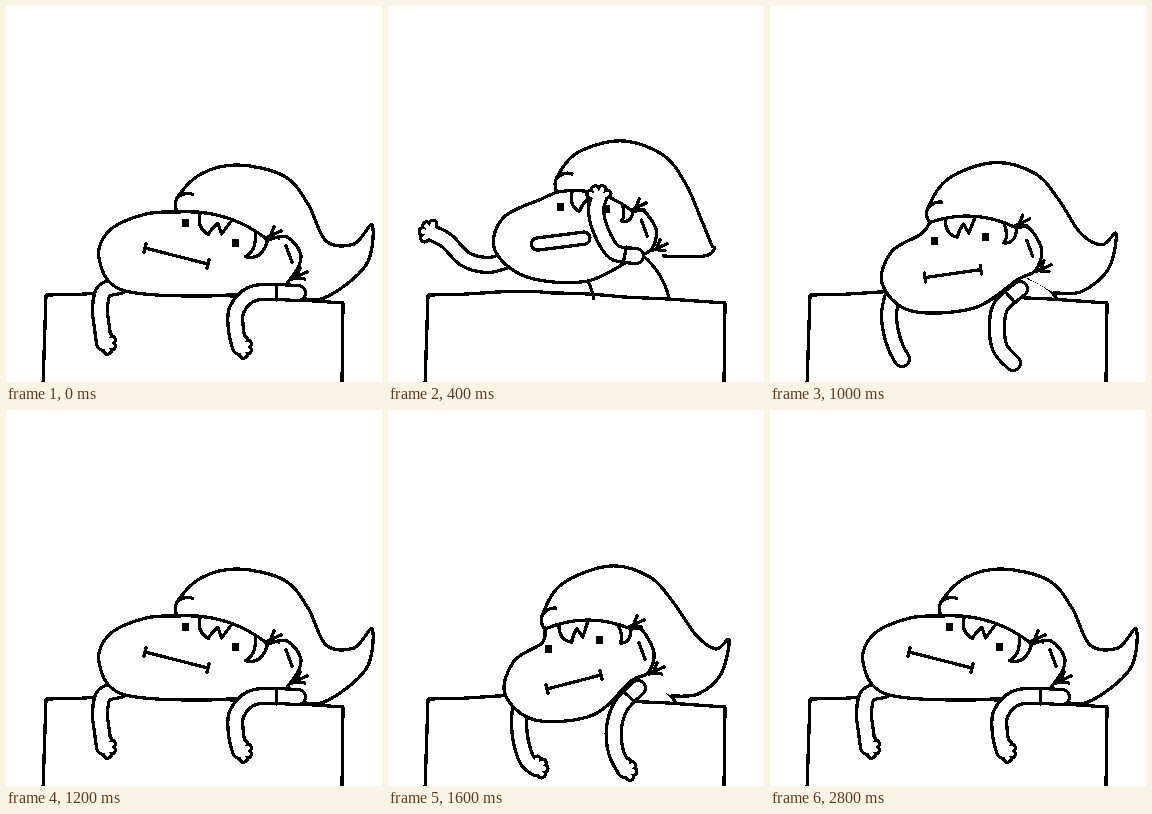
These frames come from a looping animation (376 px wide and 376 px high, 3.3 s). An HTML page:

```html
<!DOCTYPE html>
<html lang="en">
<head>
<meta charset="utf-8">
<title>Restless doodle</title>
<style>
  html, body { margin: 0; width: 100%; height: 100%; overflow: hidden; background: #fff; }
  svg { display: block; width: 100vw; height: 100vh; }
  path { stroke-linecap: round; stroke-linejoin: round; shape-rendering: crispEdges; }
</style>
</head>
<body>
<svg id="stage" viewBox="0 0 376 376"></svg>
<script>
const LOOP = 3300, PEN = 3.3;

// Key points of the three main poses; everything else is derived from them.
const lying = {
  brim: [172,206, 262,234], parting: 0.23, lock: 28,
  hat: [171,207, 171,192, 195,168, 232,159, 278,170, 302,198, 320,235, 348,238, 366,219, 360,259, 318,292, 285,290],
  head: [140,208, 104,224, 93,252, 116,284, 200,290, 268,283, 285,272, 295,250, 281,231],
  eyes: [179,217, 229,237],
  mouth: [139,242, 202,258], gape: 0,
  body: [200,282, 200,288, 262,280, 280,288],
  left: [114,280, 98,285, 94,303, 96,322, 98,337],
  right: [292,287, 249,287, 231,303, 230,324, 234,341],
  aim: [0, 0], reach: 8
};
const shouting = {
  brim: [183,146, 248,190], parting: 0.22, lock: 12,
  hat: [183,146, 186,131, 207,114, 246,109, 290,126, 313,160, 320,200, 318,238, 309,258, 301,232, 287,210, 264,206],
  head: [155,143, 103,163, 94,194, 128,223, 190,239, 247,230, 267,220, 271,201, 258,187],
  eyes: [186,154, 226,171],
  mouth: [138,188, 175,192], gape: 27,
  body: [188,239, 213,289, 254,227, 273,292],
  left: [100,199, 84,187, 70,165, 66,145, 68,128],
  right: [268,233, 238,230, 224,202, 230,168, 248,138],
  aim: [-1.6, -0.8], reach: 10
};
const bored = {
  brim: [157,219, 243,219], parting: 0.16, lock: 18,
  hat: [157,220, 154,206, 174,174, 222,156, 262,167, 285,192, 308,225, 328,239, 341,230, 333,264, 310,284, 284,286],
  head: [154,233, 126,251, 117,284, 147,310, 205,305, 243,271, 260,263, 266,243, 254,220],
  eyes: [160,239, 211,230],
  mouth: [159,279, 213,265], gape: 0,
  body: [200,290, 200,296, 258,270, 288,293],
  left: [132,298, 131,314, 133,332, 139,350, 148,358],
  right: [250,278, 233,296, 226,318, 228,342, 237,360],
  aim: [-0.3, -0.2], reach: 8
};

function mix(a, b, k) {
  if (typeof a === 'number') return a + (b - a) * k;
  if (Array.isArray(a)) return a.map((v, i) => mix(v, b[i], k));
  return Object.fromEntries(Object.keys(a).map(n => [n, mix(a[n], b[n], k)]));
}

// Arms flung sideways, for the jump up and the drop back down.
const fling = (pose, dx, dy) => Object.assign(pose, {
  left: [100,230, 82,234, 60,228, 42,210, 27,202].map((v, i) => v + (i % 2 ? dy : dx)),
  right: [248,250, 226,246, 213,225, 208,205, 211,192],
  aim: [-2.6, -1.6]
});
const rising = fling(mix(lying, shouting, 0.5), 0, 0);
const falling = fling(mix(shouting, bored, 0.55), 17, 25);
const slumping = mix(bored, lying, 0.6);
const turning = Object.assign(mix(bored, lying, 0.2), {
  left: [122,292, 119,308, 121,326, 126,342, 132,353],
  right: [250,283, 231,300, 227,320, 230,342, 243,357],
  reach: 0
});

const steps = [
  [0, lying], [100, rising], [200, shouting], [400, falling], [500, bored],
  [1000, turning], [1100, slumping], [1200, lying],
  [1400, slumping], [1500, turning], [1600, bored],
  [2600, turning], [2700, slumping], [2800, lying]
];

const points = flat => flat.flatMap((v, i) => i % 2 ? [] : [[v, flat[i + 1]]]);

function spline(flat) {
  const p = points(flat);
  return 'M' + p[0] + p.slice(1).map((c, i) => {
    const b = p[i], a = p[i - 1] || b, e = p[i + 2] || c;
    const c1 = b.map((v, j) => v + (c[j] - a[j]) / 6);
    const c2 = c.map((v, j) => v - (e[j] - b[j]) / 6);
    return `C${c1} ${c2} ${c}`;
  }).join('');
}

const path = (d, color, width, fill = 'none') =>
  `<path d="${d}" stroke="${color}" stroke-width="${Math.max(0, width)}" fill="${fill}"/>`;
const line = (d, fill) => path(d, '#000', PEN, fill);
// Outline of thick strokes merged into one shape.
const tubes = list =>
  list.map(([d, w]) => path(d, '#000', w + PEN)).join('') +
  list.map(([d, w]) => path(d, '#fff', w - PEN)).join('');

function arm(flat, aim, reach) {
  const [x, y] = flat.slice(-2);
  let fingers = '';
  for (let i = 0; i < 4; i++) {
    const a = aim + (i - 1.5) * 0.75;
    fingers += `M${x} ${y}l${reach * Math.cos(a)} ${reach * Math.sin(a)}`;
  }
  return tubes([[spline(flat), 15], [fingers, 8]]);
}

function cuff([x0, y0, x1, y1]) {
  const n = 7 / Math.hypot(x1 - x0, y1 - y0);
  const x = mix(x0, x1, 0.5), y = mix(y0, y1, 0.5);
  const dx = (y0 - y1) * n, dy = (x1 - x0) * n;
  return line(`M${x - dx} ${y - dy}L${x + dx} ${y + dy}`);
}

const tuft = (x, y) => line(`M${x - 7} ${y + 4}l15 -7m-7 -4l-4 10l9 1`);

function sides([x0, y0, x1, y1, ...rest]) {
  const d = `M${x0} ${y0}Q${mix(x0, x1, 0.75)} ${mix(y0, y1, 0.4)} ${x1} ${y1}`;
  return line(d) + (rest.length ? sides(rest) : '');
}

function mouth([x0, y0, x1, y1], gape) {
  const d = `M${x0} ${y0}L${x1} ${y1}`;
  if (gape > 1) return tubes([[d, gape]]);
  const n = 4.5 / Math.hypot(x1 - x0, y1 - y0);
  const dx = (y0 - y1) * n, dy = (x1 - x0) * n;
  const tick = (x, y) => `M${x - dx} ${y - dy}L${x + dx} ${y + dy}`;
  return line(d + tick(x0, y0) + tick(x1, y1));
}

function figure(p) {
  const [bx, by, ex, ey] = p.brim;
  const size = Math.hypot(ex - bx, ey - by), c = (ex - bx) / size, s = (ey - by) / size;
  const turn = (u, v) => [u * c - v * s, u * s + v * c];
  // Place on the brim: u along it from 0 to 1, v below its arch.
  const hang = (u, v) => {
    const [dx, dy] = turn(u * size, v - 36 * u * (1 - u));
    return [bx + dx, by + dy];
  };
  const [tx, ty] = turn(size / 2, -18);
  const head = spline([bx, by, bx, by, ...p.head, ex, ey, ex, ey]) + `Q${bx + tx} ${by + ty} ${bx} ${by}Z`;

  const f = p.parting;
  const fringe = `M${hang(f, 0)}Q${hang(f, 16)} ${hang(f + 0.15, 21)}` +
    `Q${hang(f + 0.16, 14)} ${hang(f + 0.21, 8)}L${hang(f + 0.28, 17)}L${hang(f + 0.34, 1)}`;

  const n = p.lock, tip = hang(1 - 0.6 * n / size, n);
  const lock = `M${ex} ${ey}Q${hang(1, n * 0.8)} ${tip}Q${hang(0.92, n * 0.6)} ${hang(0.85, 1)}`;

  const [hx, hy] = p.hat.slice(2, 4);
  const fold = `M${hx} ${hy}q${turn(6, -9)} ${turn(14, -8)}`;
  const [jx, jy, earX, earY] = p.head.slice(12, 16);
  const eyes = points(p.eyes).map(([x, y]) => `M${x - 3} ${y - 4}h7v8h-7z`).join('');

  return sides(p.body) + line(spline(p.hat), '#fff') + line(fold) +
    arm(p.left, p.aim[0], p.reach) + line(head, '#fff') +
    line(fringe) + line(lock) + path(eyes, 'none', 0, '#000') + mouth(p.mouth, p.gape) +
    line(`M${earX - 15} ${earY - 10}l6 16`) + tuft(ex + 5, ey - 6) + tuft(jx + 8, jy - 3) +
    arm(p.right, p.aim[1], p.reach) + cuff(p.right);
}

const box = line('M37 380L40 289Q75 289 110 286Q140 284 165 287Q200 287 235 291L280 293L337 297L336 380', '#fff');
const stage = document.getElementById('stage');
const start = performance.now();
let shown;

function tick() {
  const t = (performance.now() - start) % LOOP;
  const pose = steps.filter(s => s[0] <= t).pop()[1];
  if (pose !== shown) stage.innerHTML = box + figure(pose);
  shown = pose;
  requestAnimationFrame(tick);
}
tick();
</script>
</body>
</html>
```
